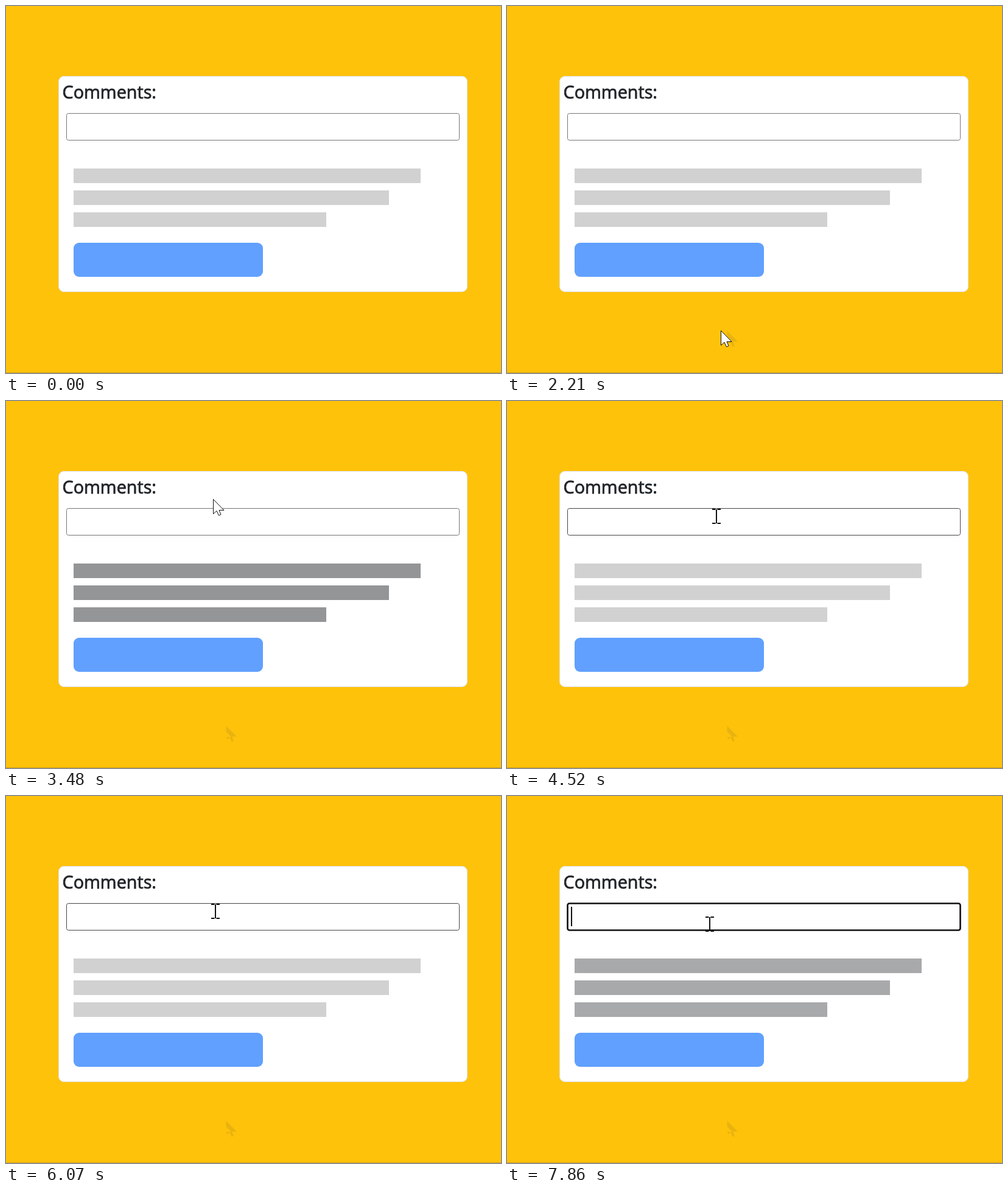
An HTML page for the animation above (8 s loop, 813 by 603 pixels).

```html
<!DOCTYPE html>
<html lang="en">
<head>
<meta charset="utf-8">
<title>Comment form</title>
<style>
  html, body { margin: 0; width: 100%; height: 100%; overflow: hidden; background: #ffc20a; }
  svg { display: block; width: 813px; height: 603px; }
  text { font: 28.8px "Open Sans", "Noto Sans", sans-serif; fill: #212529; stroke: #212529; stroke-width: .8px; }
</style>
</head>
<body>
<svg viewBox="0 0 813 603">
  <defs>
    <path id="pointer" d="M.5 .5V24.5L6 19.5L9.5 27L13 25.5L10 18.5H18Z"/>
  </defs>
  <rect width="813" height="603" fill="#ffc20a"/>
  <rect y="602" width="813" height="1" fill="#cc9d17"/>
  <rect x="86.5" y="115.5" width="671" height="354" rx="8.5" fill="#fff" stroke="#dfdfdf"/>
  <text x="92.5" y="152">Comments:</text>
  <rect id="field" x="99.5" y="176.5" width="645" height="44" rx="3" fill="#fff"/>
  <rect id="caret" x="105" y="182" width="2" height="32" fill="#101010"/>
  <g id="bars" fill="#212529">
    <rect x="111" y="267" width="570" height="24"/>
    <rect x="111" y="303" width="518" height="24"/>
    <rect x="111" y="339" width="415" height="24"/>
  </g>
  <rect x="111" y="389" width="311" height="56" rx="9" fill="#61a0ff"/>
  <g id="trail">
    <use href="#pointer" x="361" y="533" fill="#e9b310"/>
    <use href="#pointer" x="351" y="533" fill="#ffc20a" stroke="#ffc20a"/>
  </g>
  <use id="arrow" href="#pointer" fill="#fff" stroke="#111"/>
  <path id="beam" d="M0 -11V12M-7 -11H-1.5M1.5 -11H7M-7 12H-1.5M1.5 12H7" fill="none" stroke="#111" stroke-width="2"/>
</svg>
<script>
const LOOP = 8000, TICK = 70;
const PULSE = 2075, PEAK = 1135;
const FOCUS_AT = 7380, TRAIL_AT = 2210;

// pointer moves: each starts where the one before it ended
const origin = { x: 620, y: 547 };
const moves = [
  { at: 1930, ticks: 5, x: 351, y: 533 },
  { at: 3270, ticks: 4, x: 340, y: 161 },
  { at: 3550, ticks: 8, x: 344, y: 189 },
  { at: 7110, ticks: 1, x: 337, y: 204 },
  { at: 7650, ticks: 1, x: 333, y: 210 }
];

const [field, caret, bars, trail, arrow, beam] =
  ["field", "caret", "bars", "trail", "arrow", "beam"].map(id => document.getElementById(id));

const show = (node, on) => node.setAttribute("visibility", on ? "visible" : "hidden");
const easeOut = u => 1 - (1 - u) ** 2;

// a smooth pulse held at four levels
function glow(t) {
  const wave = (1 + Math.cos(2 * Math.PI * (t - PEAK) / PULSE)) / 2;
  return .205 + .092 * Math.round(3 * wave);
}

function pointerAt(t) {
  const i = moves.findLastIndex(m => m.at <= t);
  if (i < 0) return null;
  const to = moves[i], from = moves[i - 1] || origin;
  const done = Math.min(to.ticks, Math.floor((t - to.at) / TICK) + 1);
  const k = easeOut(done / to.ticks);
  const mix = axis => Math.round(from[axis] + (to[axis] - from[axis]) * k);
  return { x: mix("x"), y: mix("y") };
}

function draw(t) {
  bars.setAttribute("opacity", glow(t));

  const p = pointerAt(t);
  const hover = p && p.y > 176 && p.y < 221;
  show(arrow, p && !hover);
  show(beam, hover);
  if (p) (hover ? beam : arrow).setAttribute("transform", `translate(${p.x} ${p.y})`);

  const focus = t >= FOCUS_AT;
  field.setAttribute("stroke", focus ? "#101010" : hover ? "#454545" : "#767676");
  field.setAttribute("stroke-width", focus ? 2.6 : 1);
  show(caret, focus);
  show(trail, t >= TRAIL_AT);
}

const start = performance.now();
function tick() {
  draw((performance.now() - start) % LOOP);
  requestAnimationFrame(tick);
}
tick();
</script>
</body>
</html>
```
